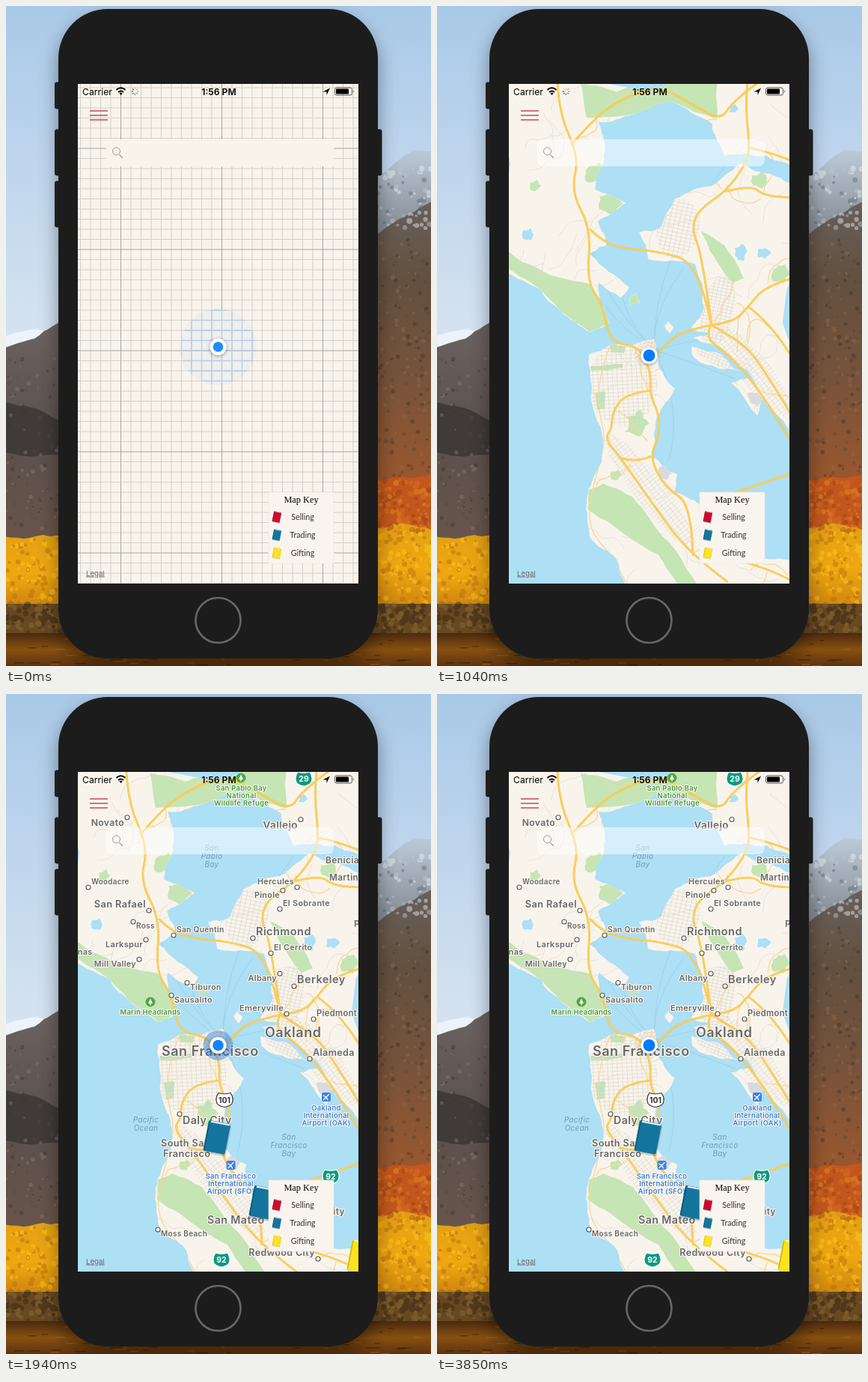
These frames come from a looping animation (568 px wide and 881 px high, 3950 ms). An HTML page:

```html
<!DOCTYPE html>
<html lang="en">
<head>
<meta charset="utf-8">
<title>Map app</title>
<style>
html, body { margin: 0; height: 100%; overflow: hidden; }
svg { display: block; width: 568px; height: 881px; font-family: Inter, "Liberation Sans", sans-serif; }
.line { fill: none; stroke-linejoin: round; stroke-linecap: round; }
.label { font-weight: 600; fill: #686868; stroke: #faf7f1; stroke-width: 2.2; paint-order: stroke; stroke-linejoin: round; }
.sea { font-weight: 400; font-style: italic; fill: #6f9dba; stroke: none; }
.park { fill: #469a3f; }
.air { fill: #3c7fd9; }
</style>
</head>
<body>
<svg id="stage" viewBox="0 0 568 881"></svg>
<script>
let seed = 7;
const rnd = () => (seed = (seed * 16807) % 2147483647) / 2147483647;
const between = (a, b) => a + (b - a) * rnd();
const pick = list => list[Math.floor(rnd() * list.length)];
const times = (n, f) => Array.from({ length: n }, (_, i) => f(i));
const draw = (n, f) => times(n, f).join('');
const points = s => s.split(' ').map(p => p.split(',').map(Number));
const poly = (p, fill) => `<polygon points="${p}" fill="${fill}"/>`;

// Rough outline: each round adds a shifted midpoint to every side
function rough(s, amount = .09, rounds = 3) {
  let p = points(s);
  while (rounds--) p = p.flatMap(([x, y], i) => {
    const [u, v] = p[(i + 1) % p.length], k = between(-amount, amount);
    return [[x, y], [(x + u) / 2 + (v - y) * k, (y + v) / 2 - (u - x) * k]];
  });
  return p.map(q => q.map(c => c.toFixed(1))).join(' ');
}
const blob = ([x, y, r]) => rough(times(5, i => {
  const a = i * 1.257, d = r * between(.7, 1.2);
  return `${x + d * Math.cos(a)},${y + d * Math.sin(a)}`;
}).join(' '), .2, 2);

// Smooth open curve through the midpoints of a list of points
function curve(s) {
  const p = points(s), last = p.length - 1;
  let d = `M${p[0]}`;
  for (let i = 1; i < last; i++) {
    const [x, y] = p[i], [u, v] = p[i + 1];
    d += `Q${p[i]} ${i === last - 1 ? p[last] : [(x + u) / 2, (y + v) / 2]}`;
  }
  return last === 1 ? d + `L${p[1]}` : d;
}
const strokes = (list, color, width) =>
  `<path class="line" d="${list.map(curve).join('')}" stroke="${color}" stroke-width="${width}"/>`;

// ---- Landscape behind the phone
const gradient = (id, ...colors) => `<linearGradient id="${id}" x2="0" y2="1">${colors.map((c, i) => `<stop offset="${i / (colors.length - 1)}" stop-color="${c}"/>`).join('')}</linearGradient>`;
const specks = (n, x, y, h, r, ...colors) => draw(n, () =>
  `<circle cx="${between(x, x + 75).toFixed(1)}" cy="${between(y, y + h).toFixed(1)}" r="${between(r / 3, r).toFixed(1)}" fill="${pick(colors)}"/>`);
const scenery = () => `
  <rect width="568" height="881" fill="url(#sky)"/>
  ${poly(rough('-20,447 42,431 90,445 90,480 -20,480', .04), '#edf3f9')}
  ${poly(rough('-20,462 38,444 90,412 90,740 -20,740', .04), 'url(#hillL)')}
  ${poly(rough('-20,530 30,535 90,560 90,600 -20,592', .06), '#403a38')}
  ${poly(rough('480,240 520,209 545,192 590,200 590,380 480,380', .05), 'url(#snow)')}
  ${poly(rough('480,312 530,282 590,245 590,740 480,740', .05), 'url(#hillR)')}
  <g opacity=".45">${specks(110, 0, 470, 230, 3, '#3c3634', '#8a7970', '#574b46')}
  ${specks(70, 495, 215, 85, 4, '#eef2f6', '#62666e', '#bcc7d2')}
  ${specks(180, 495, 310, 320, 3, '#3f322b', '#94694a', '#5a4637')}</g>
  ${poly(rough('480,640 530,628 590,622 590,730 480,730', .08), '#c2571d')}
  ${poly(rough('-20,708 50,706 90,712 90,810 -20,810', .08), 'url(#leaf)')}
  ${poly(rough('480,704 530,690 590,708 590,810 480,810', .08), 'url(#leaf)')}
  <g opacity=".5">${specks(130, 495, 632, 70, 4, '#dd6d1e', '#9c441a', '#e88b22')}
  ${specks(130, 0, 712, 85, 4, '#ffc71f', '#b87010', '#f0a010')}${specks(130, 495, 704, 95, 4, '#ffc71f', '#b87010', '#f0a010')}</g>
  <rect y="798" width="568" height="42" fill="#67481f"/>
  <g opacity=".5">${specks(70, 0, 798, 38, 5, '#8a6a36', '#3d2a18')}${specks(70, 495, 798, 38, 5, '#8a6a36', '#3d2a18')}</g>
  <rect y="837" width="568" height="44" fill="url(#lake)"/>
  ${draw(80, () => `<rect x="${between(-9, 560).toFixed()}" y="${between(838, 880).toFixed()}" width="${between(3, 18).toFixed()}" height="1.500" fill="${pick(['#b0690f', '#2d1a0a'])}" opacity=".5"/>`)}`;

// ---- Map: key points only, the detail comes from rough()
const lands = [
  '80,80 490,80 490,225 440,202 384,203 368,160 312,130 262,147 216,157 225,195 211,247 252,266 215,290 226,322 204,334 257,378 246,392 216,372 231,425 204,438 165,410 140,382 80,345',
  '490,250 438,226 405,213 372,240 318,260 300,297 270,304 282,340 345,347 357,405 340,432 366,440 338,444 370,455 414,488 440,535 490,600',
  '340,457 380,468 406,490 375,486 342,470', '393,505 420,500 438,525 428,549',
  '203,468 232,454 290,447 296,484 318,513 298,545 287,604 321,628 318,652 352,668 400,690 438,740 490,750 490,790 254,790 236,736 205,713 200,660 220,612 220,570 207,510',
  '304,430 309,423 316,431 311,440', '256,393 266,385 271,399 258,402'
].map(s => rough(s));
const greens = [
  '192,106 240,117 284,98 374,98 374,153 312,130 262,147 200,152', '80,322 152,362 205,374 231,425 204,438 165,410 140,382 80,345',
  '353,303 384,322 410,366 395,372 365,330', '203,648 222,640 262,658 285,688 348,775 322,775 296,735 262,715 202,675',
  '205,483 248,480 248,486 206,489', '231,453 252,457 250,466 233,465', '256,393 266,385 271,399 258,402', '211,519 225,517 224,540 214,542'
].map(s => rough(s, .04)).concat(points('266,560,17 230,265,16 431,236,14 212,225,15 131,242,9 460,362,13 445,724,12 240,629,8').map(blob));
const lakes = points('405,331,11 437,332,9 122,307,8 218,527,4 396,140,6').map(blob);
const runways = points('304,626,11 425,526,11').map(blob);
const highways = [
  '161,104 163,145 190,205 179,250 206,300 200,370 222,402 231,452 271,457 286,492 284,520 297,548 297,575 284,606 306,646 340,668 342,735',
  '205,301 222,318 256,327 296,330 350,346 366,426',
  '415,104 412,135 418,192 412,215 386,250 350,274 340,300 354,334 367,428',
  '180,187 210,153 242,129 296,108 344,136 380,155 395,130 430,104',
  '386,250 420,241 438,257 471,258', '367,428 396,425 416,404 438,377 471,367', '416,404 445,425 471,466',
  '367,428 386,440 412,456 438,489 471,544', '366,428 358,446 386,464 430,512 471,580', '290,472 310,449 332,436 367,428',
  '284,516 252,520 234,545 234,566 224,580 246,606 290,670 336,732 388,771',
  '246,606 266,612 285,604', '352,668 471,627', '400,742 440,752 471,768', '418,192 440,196 471,208'
];
const coastRoad = '232,455 218,490 215,540 226,580 214,625 202,672 207,708 236,738 254,775';
const ferries = points('385,216 206,322 226,404 350,448 330,352 398,500 310,610 246,382')
  .map(([x, y]) => `290,462 ${(290 + x) / 2 + (y - 462) * .2},${(462 + y) / 2} ${x},${y}`);

// A wandering minor road
function lane(x, y, n) {
  let a = between(0, 6.3);
  return times(n, () => {
    a += between(-.7, .7);
    return `${(x += 6 * Math.cos(a)).toFixed(1)},${(y += 6 * Math.sin(a)).toFixed(1)}`;
  }).join(' ');
}
const lanes = () => times(110, () => lane(between(96, 471), between(104, 771), 12));
const branches = () => times(26, () => lane(...pick(points(pick(highways))), 11));

// Street grids: centre, radii, tilt, spacing
const towns = [[248, 508, 46, 55, -3, 5], [280, 466, 16, 18, 30, 3.5], [322, 300, 28, 40, 12, 5], [375, 410, 22, 48, 12, 4.5], [425, 490, 20, 75, -38, 5], [285, 650, 20, 95, -38, 5], [378, 474, 34, 9, 22, 4]];
const streets = () => towns.map(([x, y, rx, ry, tilt, gap], n) => {
  const d = draw(40, i => `M-99 ${(i - 20) * gap}H99M${(i - 20) * gap * 1.3} -99V99`);
  return `<g transform="translate(${x} ${y}) rotate(${tilt})"><clipPath id="t${n}"><ellipse rx="${rx}" ry="${ry}"/></clipPath><path clip-path="url(#t${n})" d="${d}" stroke="#d3cec7" stroke-width=".5"/></g>`;
}).join('');
const terrain = () => `
  <rect x="96" y="95" width="375" height="690" fill="#addff5"/>
  ${strokes(ferries, '#98cce5', .7)}
  <clipPath id="land">${lands.map(p => poly(p)).join('')}</clipPath>
  ${lands.map(p => poly(p, '#f8f4ec')).join('')}
  <g clip-path="url(#land)">${greens.map(p => poly(p, '#c5e5b4')).join('')}
  ${lakes.map(p => poly(p, '#addff5')).join('')}${streets()}
  ${strokes(lanes(), '#dfdad2', .7)}${strokes([...branches(), coastRoad], '#fbd595', 1.3)}</g>
  ${runways.map(p => poly(p, '#d8dade')).join('')}
  ${strokes(highways, '#f5b93f', 2.7)}${strokes(highways, '#ffd159', 1.900)}`;

// ---- Labels: x is the edge beside the town's marker; r/l = side, u/d = marker above or below
const places = [
  ['Novato', 158, 176, 12.2, 'ru'], ['Vallejo', 390, 180, 13.5, 'ru'], ['San Rafael', 187, 285, 12.8, 'rd'], ['Richmond', 334, 322, 14.5, 'ld'],
  ['Berkeley', 389, 386, 14.5, 'ld'], ['Daly City', 236, 574, 14.2, 'lu'], ['Redwood City', 413, 750, 12.5, 'rd'], ['Woodacre', 114, 254, 9.8, 'ld'],
  ['Ross', 174, 313, 10, 'lu'], ['San Quentin', 228, 318, 10.2, 'ld'], ['Larkspur', 183, 338, 11, 'ru'], ['Mill Valley', 174, 364, 10.8, 'ru'],
  ['Tiburon', 246, 395, 10.5, 'lu'], ['Sausalito', 225, 412, 10.8, 'lu'], ['Hercules', 385, 254, 10.8, 'rd'], ['Pinole', 366, 272, 10.8, 'ru'],
  ['El Sobrante', 370, 283, 10.8, 'ld'], ['El Cerrito', 358, 342, 10.8, 'ld'], ['Albany', 362, 383, 10.8, 'ru'], ['Emeryville', 371, 423, 11, 'rd'],
  ['Piedmont', 415, 430, 11.2, 'ld'], ['Alameda', 410, 483, 12.5, 'ld'], ['Moss Beach', 207, 724, 10, 'lu'], ['Oakland', 346, 458, 18, 'l'],
  ['San Francisco', 208, 483, 18, 'l'], ['South San', 207, 604, 12.7, 'l'], ['Francisco', 210, 618, 12.7, 'l'], ['San Mateo', 269, 707, 14.2, 'l'],
  ['Foster City', 453, 695, 12, 'r'], ['Benicia', 427, 226, 12, 'l'], ['Martinez', 432, 249, 11.8, 'l'], ['Bolinas', 115.5, 348, 10.8, 'r'], ['Pleasant Hill', 465, 311, 12, 'l']
];
const text = (s, x, y, size, anchor, kind = '') =>
  `<text class="label ${kind}" x="${x}" y="${y}" font-size="${size}" text-anchor="${anchor}" letter-spacing="${size * .03}">${s}</text>`;
function place([s, x, y, size, [side, level]]) {
  const left = side === 'l', dot = level &&
    `<circle cx="${x + (left ? -4 : 4)}" cy="${level === 'u' ? y - size + 1 : y + 4}" r="3" fill="#fff" stroke="#555" stroke-width="1.100"/>`;
  return (dot || '') + text(s, x, y, size, left ? 'start' : 'end');
}
const stack = (lines, x, y, kind) => lines.split('|').map((s, i) => text(s, x, y + i * (kind === 'sea' ? 11 : 10), kind === 'sea' ? 10 : 9.400, 'middle', kind)).join('');
const sign = (x, y, n, fill, ink) => `<g transform="translate(${x} ${y})"><path d="M-8 -9Q0 -6.500 8 -9Q13 -2 10 5Q7 9 0 10Q-7 9 -10 5Q-13 -2 -8 -9Z" fill="${fill}" stroke="${ink}" stroke-width="1.200"/><text y="4" font-size="10.500" font-weight="700" fill="${ink}" text-anchor="middle">${n}</text></g>`;
const plane = (x, y) => `<g transform="translate(${x} ${y})"><rect x="-6" y="-6" width="12" height="12" rx="2.500" fill="#3c82e6"/><path d="M3.500 -3.500L-3.500 3.500M0 0L-4 -2M0 0L2 4" class="line" stroke="#fff" stroke-width="1.200"/></g>`;
const tree = (x, y) => `<g transform="translate(${x} ${y})"><circle r="6.500" fill="#4fa848"/><path d="M0 -4.500L3 2H.7V4.500H-.7V2H-3Z" fill="#fff"/></g>`;
const labels = () => `
  ${stack('San|Pablo|Bay', 275, 209, 'sea')}${stack('Pacific|Ocean', 187, 572, 'sea')}${stack('San|Francisco|Bay', 378, 595, 'sea')}
  ${stack('San Pablo Bay|National|Wildlife Refuge', 314.5, 129, 'park')}${stack('Marin Headlands', 193, 428, 'park')}
  ${stack('Oakland|International|Airport (OAK)', 428, 556, 'air')}${stack('San Francisco|International|Airport (SFO)', 300.5, 647, 'air')}
  ${places.map(place).join('')}
  ${sign(398, 113, 29, '#0b9a80', '#fff')}${sign(434, 644, 92, '#0b9a80', '#fff')}${sign(288, 755, 92, '#0b9a80', '#fff')}${sign(292, 541.5, 101, '#fff', '#333')}
  ${plane(428, 538)}${plane(300.5, 629)}${tree(314, 112)}${tree(193, 411)}`;

const book = (x, y, scale, color, edge) => `<g transform="translate(${x} ${y}) rotate(11) scale(${scale})">
  <rect x="-14" y="-19" width="30" height="42" rx="2" opacity=".18"/>
  <rect x="-15" y="-21" width="29.500" height="41.500" rx="2" fill="${color}"/>
  <path d="M-12 -19.500H13.500" stroke="#e9eef0" stroke-width="2.200"/>
  <path d="M-14 -19V19.500" stroke="${edge}" stroke-width="1.600"/></g>`;
const teal = ['#14759e', '#0d5878'], yellow = ['#fbe41d', '#cdb70d'], red = ['#cc0a2c', '#93061f'];
const entry = (s, y, colors) => `${book(362, y, .34, ...colors)}<text x="396.500" y="${y + 4}" font-size="10.700" text-anchor="middle" font-family="Lato, sans-serif" fill="#333">${s}</text>`;

// ---- Empty map grid
let minor = '', major = '';
const rule = (i, d) => { if (i % 10) minor += d; else major += d; };
for (let i = -4; i < 24; i++) rule(i, `M${153.5 + i * 13.5} 104V771`);
for (let i = -6; i < 44; i++) rule(i, `M96 ${190 + i * 13.5}H471`);

document.getElementById('stage').innerHTML = `
<defs>
  ${gradient('sky', '#a9c9e8', '#c0d6ed', '#d5e3f1', '#d5e3f1', '#d5e3f1')}
  ${gradient('snow', '#bccad8', '#8b929b', '#6b6765')}
  ${gradient('hillL', '#6b6463', '#5b504b', '#6a564a')}
  ${gradient('hillR', '#67615f', '#63503f', '#76533c', '#96572f', '#a3562a')}
  ${gradient('leaf', '#e2a013', '#f0a810', '#c47c10')}
  ${gradient('lake', '#4b2a10', '#87500f', '#5e340e')}
  <filter id="cast" x="-20%" y="-10%" width="140%" height="120%"><feDropShadow dx="0" dy="12" stdDeviation="13" flood-opacity=".4"/></filter>
  <filter id="soft" x="-50%" y="-50%" width="200%" height="200%"><feDropShadow dx="0" dy="1" stdDeviation="2.500" flood-opacity=".4"/></filter>
  <clipPath id="screen"><rect x="96" y="104" width="375" height="667"/></clipPath>
  <clipPath id="halo"><circle cx="283.500" cy="455" r="50"/></clipPath>
</defs>
${scenery()}
<g fill="#252525" stroke="#111" stroke-width=".8">
  <rect x="65.500" y="102" width="9" height="35" rx="2"/><rect x="65.500" y="165" width="9" height="61" rx="2"/>
  <rect x="65.500" y="234" width="9" height="61" rx="2"/><rect x="493" y="165" width="9" height="61" rx="2"/>
</g>
<rect x="70" y="4" width="427" height="867" rx="66" fill="#1b1b1b" filter="url(#cast)"/>
<circle cx="283.500" cy="820" r="30" fill="none" stroke="#686868" stroke-width="2.600"/>
<g clip-path="url(#screen)">
  <g id="grid">
    <rect x="96" y="104" width="375" height="667" fill="#f8f4ec"/>
    <path d="${minor}" stroke="#d3d0ca"/><path d="${major}" stroke="#a5a5a1"/>
    <path id="glow" d="${minor}${major}" stroke="#b7d0ea" stroke-width="1.300" clip-path="url(#halo)"/>
    <rect x="134" y="178" width="304" height="36" fill="#f8f4ec"/>
    <rect id="field" x="166" y="178" width="177" height="36" fill="#fbfbf9"/>
  </g>
  <g id="map">${terrain()}
    <g id="labels">${labels()}</g>
    <g id="books">${book(282, 592, 1, ...teal)}${book(343, 679, 1, ...teal)}${book(474, 751, 1, ...yellow)}</g>
  </g>
  <g id="here">
    <circle id="pulse" fill="#2878dc"/>
    <circle r="11" fill="#fff" filter="url(#soft)"/><circle id="dot" fill="#007aff"/>
  </g>
  <rect id="search" x="134" y="178" width="304" height="36" rx="8" fill="#fff" opacity=".5"/>
  <path d="M151.500 198.500L156 203" stroke="#999" stroke-width="1.300"/><circle cx="147.500" cy="194" r="5" fill="none" stroke="#999"/>
  <path d="M112 140H136M112 146H136M112 152H136" stroke="#d8576f" stroke-width="1.800" opacity=".85"/>
  <text x="102" y="118.500" font-size="12.200">Carrier</text>
  <text x="284.500" y="118.500" font-size="12.200" font-weight="600" text-anchor="middle">1:56 PM</text>
  <path d="M147.500 112Q153.500 106.500 159.500 112M150 115Q153.500 112 157 115" fill="none" stroke="#000" stroke-width="2"/>
  <path d="M151.300 116.500Q153.500 115 155.700 116.500L153.500 119Z"/>
  <g id="spinner">${draw(8, i => `<path d="M0 -2.500V-5" transform="rotate(${i * 45})" stroke="#555" stroke-width="1.200" opacity="${.25 + i * .1}"/>`)}</g>
  <path d="M433 109.500L428.500 119V114.500H423.500Z"/>
  <rect x="439.500" y="109" width="23" height="10" rx="2.500" fill="none" stroke="#555"/><rect x="441" y="110.500" width="17" height="7" rx="1"/><path d="M464 112.500Q466 114 464 115.500Z" fill="#555"/>
  <text x="107" y="760.500" font-size="9.600" fill="#6a6a6a" text-decoration="underline">Legal</text>
  <rect x="351" y="649" width="87" height="95" fill="#f9f5ee" stroke="#ebe7e0" stroke-width=".6"/>
  <text x="394.500" y="663" font-size="12.300" text-anchor="middle" font-family="Liberation Serif, serif">Map Key</text>
  ${entry('Selling', 682, red)}${entry('Trading', 706, teal)}${entry('Gifting', 730, yellow)}
</g>`;

const el = Object.fromEntries([...document.querySelectorAll('[id]')].map(e => [e.id, e]));
const set = (id, attrs) => { for (const a in attrs) el[id].setAttribute(a, attrs[a]); };
const show = (id, on) => set(id, { display: on ? 'inline' : 'none' });
const STEP = 148, LOOP = 3950;

function render(now) {
  const k = Math.min(26, Math.floor((now % LOOP) / STEP)), t = k * STEP;
  const loaded = k >= 6;
  const slide = loaded ? Math.min(0, (k - 8) * 2.5) : 0;
  show('grid', !loaded);
  show('map', loaded);
  show('search', loaded);
  show('field', k >= 3);
  show('books', k >= 8);
  show('spinner', k < 8);
  set('spinner', { transform: `translate(172.5 114) rotate(${k * 45})` });
  set('map', { transform: `translate(0 ${slide})` });
  set('labels', { opacity: Math.max(0, Math.min(1, (k - 10) / 2)) });

  // Location beacon: the ring eases out and fades while the dot breathes
  const phase = (t + 1500) % 3080;
  const u = Math.min(1, phase / 1600);
  const breath = Math.sin(Math.PI * Math.min(1, phase / 2200));
  set('here', { transform: `translate(283.5 ${loaded ? 469 + slide : 455})` });
  set('pulse', { r: 52 * (1 - (1 - u) ** 2), opacity: .55 * (1 - u) });
  set('dot', { r: 8 - 1.4 * breath, opacity: 1 - .16 * breath });
  show('glow', u < 1);
}

const start = performance.now();
(function tick() {
  render(performance.now() - start);
  requestAnimationFrame(tick);
})();
</script>
</body>
</html>
```
